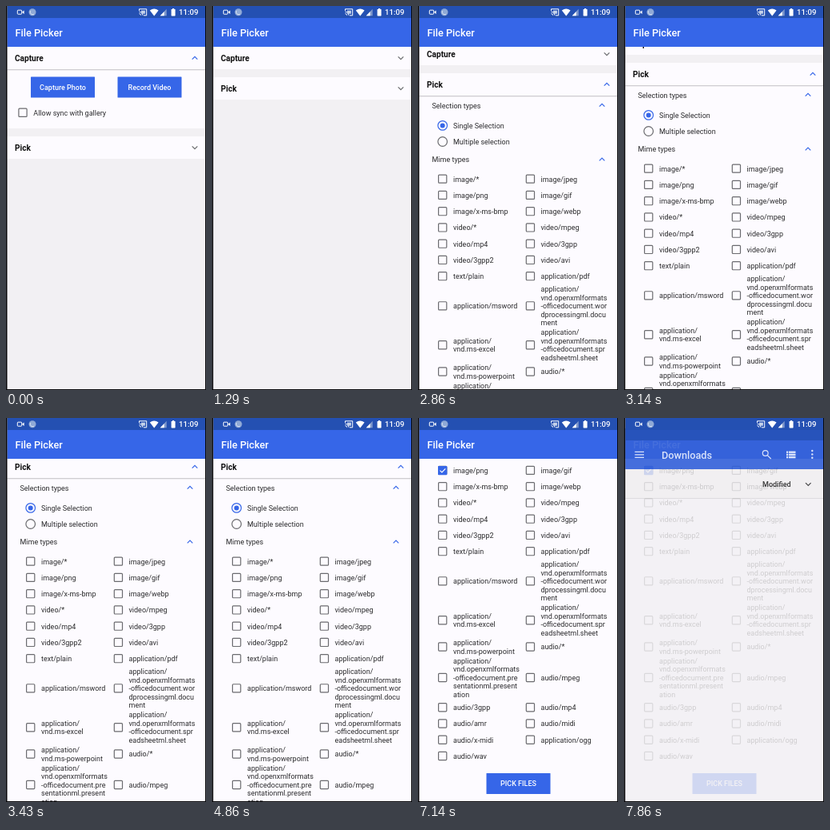
These frames come from a looping animation (250x480 px, 8 s). An HTML page:

```html
<!DOCTYPE html>
<html lang="en">
<head>
<meta charset="utf-8">
<title>File Picker</title>
<style>
  html, body { margin: 0; width: 100%; height: 100%; overflow: hidden; background: #000; }
  svg { display: block; width: 250px; height: 480px; }
  text { font: 9px Roboto, sans-serif; fill: #2c2c2e; white-space: pre; }
  .head { font-weight: 700; font-size: 10.1px; fill: #111; }
  .bar { font-weight: 500; font-size: 12.7px; fill: #fff; }
  .button { font-weight: 500; fill: #fff; text-anchor: middle; }
  .sort { font-weight: 500; fill: #111; }
  .clock { font-weight: 500; font-size: 9.6px; fill: #fff; }
  .line { fill: none; stroke-width: 1.2; }
  .thin { stroke-width: 1; }
</style>
</head>
<body>
<svg id="stage" viewBox="0 0 250 480"></svg>
<script>
const LOOP = 8000;
const BLUE = '#3666e8', DARK = '#2450b2', CARD = '#fdfbff', GREY = '#f2f0f3';
const LINE = '#6b6b6f', FRAME = '#08080a';

const rect = (x, y, w, h, fill, extra = '') =>
  `<rect x="${x}" y="${y}" width="${w}" height="${h}" fill="${fill}" ${extra}/>`;
const text = (x, y, s, cls = '') => `<text x="${x}" y="${y}" class="${cls}">${s}</text>`;
const path = (d, color, cls = '') => `<path class="line ${cls}" d="${d}" stroke="${color}"/>`;
const group = (id, body) => `<g id="${id}">${body}</g>`;

// dir: 1 points down, -1 points up
const chevron = (x, y, dir, color) =>
  path(`M${x - 3.3} ${y - 1.7 * dir}l3.3 ${3.4 * dir}l3.3 ${-3.4 * dir}`, color);
const checkbox = (x, y) =>
  rect(x - 5.1, y - 5.1, 10.2, 10.2, 'none', `rx="1" stroke="${LINE}" stroke-width="1.2"`);
const button = (x, y, w, label) =>
  rect(x - 0.5, y - 0.5, w + 1, 26, BLUE, 'rx=".5"') +
  text(x + w / 2, y + 15.7, label, 'button');
const header = (y, label) =>
  rect(1.5, y, 248.5, 28, CARD) + text(11, y + 17.6, label, 'head');
const edge = y => rect(1.5, y, 248.5, 1, '#cfcdd1') + rect(1.5, y + 1, 248.5, 1, '#efedf1');
const radio = (y, label, on) =>
  `<circle cx="30.7" cy="${y}" r="5.8" fill="none" stroke="${on ? BLUE : LINE}" stroke-width="1.2"/>` +
  (on ? `<circle cx="30.7" cy="${y}" r="3" fill="${BLUE}"/>` : '') +
  text(44, y + 3.2, label);

const office = 'application/|vnd.openxmlformats|-officedocument.';
const mimeRows = [
  ['image/*', 'image/jpeg'],
  ['image/png', 'image/gif'],
  ['image/x-ms-bmp', 'image/webp'],
  ['video/*', 'video/mpeg'],
  ['video/mp4', 'video/3gpp'],
  ['video/3gpp2', 'video/avi'],
  ['text/plain', 'application/pdf'],
  ['application/msword', office + 'wor|dprocessingml.docu|ment'],
  ['application/|vnd.ms-excel', office + 'spr|eadsheetml.sheet'],
  ['application/|vnd.ms-powerpoint', 'audio/*'],
  [office + 'pre|sentationml.present|ation', 'audio/mpeg'],
  ['audio/3gpp', 'audio/mp4'],
  ['audio/amr', 'audio/midi'],
  ['audio/x-midi', 'application/ogg'],
  ['audio/wav']
];

function mimeList(top) {
  const pitch = 10.5;
  let y = top, out = '';
  for (const row of mimeRows) {
    const cells = row.map(label => label.split('|'));
    const lines = Math.max(...cells.map(c => c.length));
    const height = lines === 1 ? 20.25 : lines * pitch + 1.7;
    const mid = y + height / 2;
    cells.forEach((cell, col) => {
      out += checkbox(30.7 + col * 109.7, mid);
      cell.forEach((line, i) => {
        out += text(44 + col * 109.5, mid + 3.4 + (i - (cell.length - 1) / 2) * pitch, line);
      });
    });
    y += height;
  }
  return out;
}

const capture =
  rect(1.5, 79, 248.5, 74, CARD) +
  button(31.5, 89, 79, 'Capture Photo') + button(140, 89, 79, 'Record Video') +
  checkbox(21, 133.3) + text(34.3, 136.7, 'Allow sync with gallery') +
  header(51, 'Capture') +
  group('captureOpen', edge(79) + chevron(236, 65, -1, BLUE)) +
  group('captureClosed', chevron(236, 65, 1, LINE));

// Laid out with the card's top at 89, its place once the first card is closed.
const pick =
  rect(1.5, 79, 248.5, 10, GREY) +
  rect(1.5, 117, 248.5, 560, CARD) +
  text(17.5, 132.6, 'Selection types') + chevron(230, 129, -1, BLUE) +
  radio(154.4, 'Single Selection', true) + radio(174.5, 'Multiple selection') +
  text(17.5, 200, 'Mime types') + chevron(230, 196.7, -1, BLUE) +
  mimeList(211) +
  group('tick', rect(25, 235.9, 11.4, 11.4, BLUE, 'rx="1"') +
    path('M27.5 241.6l2.4 2.4l4.4 -4.6', '#fff')) +
  button(86, 620.5, 79, 'PICK FILES') +
  group('cover', rect(1.5, 117, 248.5, 600, GREY)) +
  header(89, 'Pick') +
  group('pickClosed', chevron(236, 103, 1, LINE)) +
  group('pickOpen', edge(117) + chevron(236, 103, -1, BLUE));

const appBar = rect(1.5, 15, 248.5, 36, BLUE) + text(11.5, 37.7, 'File Picker', 'bar');

const browser =
  rect(1.5, 0, 248.5, 15, DARK) + rect(1.5, 15, 248.5, 36, '#3562d8') +
  rect(1.5, 51, 248.5, 36, '#efedef') + rect(1.5, 87, 248.5, 1, '#d8d6d8') +
  rect(1.5, 88, 248.5, 392, GREY) +
  path('M13.5 29.3h11.5M13.5 32.8h11.5M13.5 36.3h11.5', '#fff') +
  text(47, 37.5, 'Downloads', 'bar') +
  '<circle cx="176.7" cy="31" r="3.4" class="line" stroke="#fff"/>' +
  path('M179.3 33.6l4.4 4.4', '#fff') +
  [28.5, 31.7, 34.9].map(y => rect(203, y, 2.2, 2.4, '#fff') + rect(206, y, 8.5, 2.4, '#fff')).join('') +
  [28, 32.4, 36.8].map(y => `<circle cx="235.3" cy="${y}" r="1.2" fill="#fff"/>`).join('') +
  text(173, 73, 'Modified', 'sort') + chevron(230.3, 69.8, 1, '#222');

const status =
  rect(1.5, 0, 248.5, 15, DARK) +
  rect(14.3, 5.2, 5.4, 5, 'none', 'rx=".8" stroke="#fff"') +
  '<path d="M20 7.7l2.6 -2.2v4.4z" fill="#fff"/>' +
  '<circle cx="33" cy="7.7" r="4.5" fill="#8fa9d6"/>' +
  path('M30.5 6a3.2 3.2 0 0 0 4.5 4.2', '#d4dff2', 'thin') +
  path('M166.5 6v-2.2h9.2v8h-3.7M166.5 7.3a4.4 4.4 0 0 1 4.4 4.4M166.5 9.6a2 2 0 0 1 2 2', '#fff', 'thin') +
  rect(169, 5.7, 4.9, 4, '#c5d2ea') +
  '<path d="M179.8 5.6q5.4 -4 10.8 0l-5.4 6.8z" fill="#fff"/>' +
  '<path d="M192.7 12.2l8 -8.4v8.4z" fill="#8099cc"/><path d="M192.7 12.2l5 -5.3v5.3z" fill="#fff"/>' +
  rect(206.6, 4, 5, 8.4, '#fff', 'rx=".6"') + rect(208, 3, 2.2, 1.2, '#fff') +
  text(216, 11.2, '11:09', 'clock');

const frame = rect(0, 0, 1.5, 480, FRAME) + rect(249, 0, 1, 480, FRAME) + rect(0, 479, 250, 1, FRAME);

document.getElementById('stage').innerHTML =
  rect(0, 0, 250, 480, GREY) +
  group('scroll', capture + group('pick', pick)) +
  appBar +
  group('barBacking', rect(1.5, 15, 248.5, 36, BLUE)) +
  group('browser', browser) + status + frame;

// Each value holds until the next step.
function play(id, property, steps) {
  const frames = [...steps, [LOOP, steps.at(-1)[1]]].map(([time, value]) =>
    ({ offset: time / LOOP, [property]: value, easing: 'steps(1, end)' }));
  document.getElementById(id).animate(frames, { duration: LOOP, iterations: Infinity });
}
const slide = (id, steps) =>
  play(id, 'transform', steps.map(([time, y]) => [time, `translateY(${y}px)`]));
const show = (id, time, opacity = 1) => play(id, 'opacity', [[0, 0], [time, opacity]]);
const hide = (id, time) => play(id, 'opacity', [[0, 1], [time, 0]]);

hide('captureOpen', 140);
show('captureClosed', 140);
slide('pick', [[0, 74], [140, 17], [430, 0]]);

hide('pickClosed', 1570);
show('pickOpen', 1570);
slide('cover', [[0, 0], [1570, 130], [1710, 310], [1860, 570]]);

slide('scroll', [
  [0, 0], [2570, -1], [2710, -3], [2860, -5], [3140, -18], [3290, -34], [3430, -42],
  [6000, -46], [6140, -59], [6290, -176]
]);
show('tick', 5000);

for (const [id, opacity] of [['barBacking', 0.55], ['browser', 0.82]]) {
  show(id, 7860, opacity);
  slide(id, [[0, 38], [7860, 13]]);
}
</script>
</body>
</html>
```
